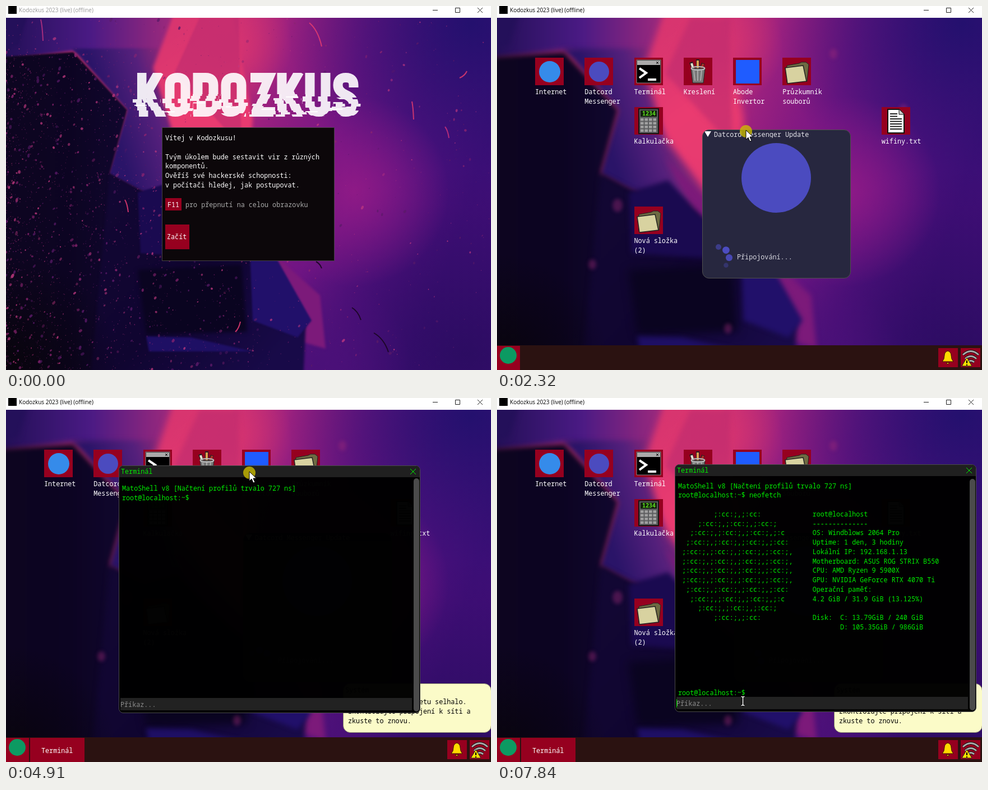
These frames come from a looping animation (865 by 648 pixels, 8000 ms). An HTML page with a canvas:

```html
<!DOCTYPE html>
<html lang="cs">
<head>
<meta charset="utf-8">
<title>Kodozkus 2023</title>
<style>
html, body { margin: 0; width: 100%; height: 100%; overflow: hidden; background: #100630; }
body { position: relative; font: 11.75px/17px "Noto Sans Mono", "DejaVu Sans Mono", monospace; color: #fff; }
div, canvas, svg { position: absolute; box-sizing: border-box; }
.t { white-space: pre; }
.red { background: #96001f; }
#bar { left: 0; top: 0; width: 865px; height: 21px; background: #fff; }
#name { left: 23px; top: 0; font: 10px/15px "Open Sans", "Noto Sans", sans-serif; }
#intro { left: 278px; top: 216px; width: 308px; height: 238px; background: #0c070a; border: 1px solid #454045; }
#update { width: 265px; height: 265px; border-radius: 12px; background: #27273f; border: 1px solid #50504e; overflow: hidden; }
#updateBar { left: 0; top: 0; width: 264px; height: 14px; overflow: hidden; color: #e4e4ea; }
#note { left: 601px; top: 508px; width: 265px; height: 88px; border-radius: 13px; background: #fbfbc8; border: 1px solid #8a8a70; color: #000; }
#term { width: 538px; height: 441px; border-radius: 8px; background: rgba(0,0,0,.985); border: 1px solid #4a4a4a; overflow: hidden; color: #00ee00; }
#termBar { left: 0; top: 0; width: 538px; height: 20px; background: #202020; }
#log { left: 5px; margin: 0; position: absolute; font: inherit; line-height: 16.77px; }
#logBox { left: 0; top: 21px; width: 524px; height: 393px; overflow: hidden; }
#scroll { left: 525px; width: 10px; border-radius: 5px; background: #4b4b4b; }
#input { left: 2px; top: 413px; width: 520px; height: 22px; background: #222; }
#caret { top: 4px; width: 1px; height: 15px; background: #00ee00; }
#halo { width: 22px; height: 22px; border-radius: 50%; background: rgba(205,190,0,.78); }
#tasks { left: 0; top: 604px; width: 865px; height: 44px; background: #2b1211; }
</style>
</head>
<body>
<div id="intro0"><canvas id="sharp" width="865" height="648"></canvas><div id="intro"></div></div>
<div id="desk">
  <canvas id="soft" width="865" height="648"></canvas>
  <div id="icons"></div>
  <div id="update">
    <svg width="265" height="265"><circle cx="131" cy="85" r="62" fill="#4b4bbf"/><g id="dots" fill="#5050cc"></g></svg>
    <div id="updateBar"><svg width="20" height="14"><path d="M3 2h12l-6 10z" fill="#fff"/></svg></div>
  </div>
  <div id="tasks">
    <div class="red" style="left:0;top:1px;width:41px;height:43px"></div>
    <div class="red" id="task" style="left:43px;top:1px;width:97px;height:43px"></div>
    <svg width="865" height="44">
      <circle cx="20" cy="18" r="15" fill="#0c9a62"/>
      <path d="M787 5h35v34h-35zM827 5h35v34h-35z" fill="#96001f"/>
      <path d="M794 29q4-4 4-11 0-6 6-8 6 2 6 8 0 7 4 11zM801 31h6l-3 3z" fill="#ffd800" stroke="#3a1400"/>
      <g fill="none" stroke="#111" stroke-width="5"><path id="waves" d="M831 17q14-13 28 0M835 24q10-9 20 0M839 30q6-5 12 0"/></g>
      <path d="M831 17q14-13 28 0M835 24q10-9 20 0M839 30q6-5 12 0" fill="none" stroke="#aaa" stroke-width="3"/>
      <path d="M838 22l9 15h-18z" fill="#ffe100" stroke="#222"/><path d="M838 27v5m0 2v2" stroke="#000" stroke-width="2"/>
    </svg>
  </div>
  <div id="note"></div>
  <div id="term">
    <div id="termBar"></div>
    <svg width="538" height="20"><path d="M519 5l10 10m0-10l-10 10" stroke="#00ee00"/></svg>
    <div id="logBox"><pre id="log"></pre></div>
    <div id="scroll"></div>
    <div id="input"><div id="typed" class="t" style="top:3px"></div><div id="caret"></div></div>
  </div>
</div>
<div id="bar">
  <svg width="865" height="21"><path d="M4 0h15v14H4z"/><path d="M761 7.5h9M801.5 3.5h8v8h-8zM841 3l9 9m0-9l-9 9" fill="none" stroke="#222"/></svg>
  <div id="name" class="t">Kodozkus 2023 (live) (offline)</div>
</div>
<div id="halo"></div>
<svg id="arrow" width="16" height="24"><path d="M1 1v17l4-4 3 7 3-1-3-7h5.500z" fill="#fff" stroke="#000"/></svg>
<svg id="beam" width="9" height="20"><g fill="none"><path d="M1 1.500h3v16H1m3 0h4M4 1.500h4" stroke="#000" stroke-width="3"/><path d="M1.500 1.500q3 0 3 2v12q0 2-3 2m6-16q-3 0-3 2m0 12q0 2 3 2" stroke="#fff" stroke-width="1.500"/></g></svg>

<script>
const $ = id => document.getElementById(id);
let seed = 11;
const rnd = () => (seed = seed * 16807 % 2147483647) / 2147483647;

// y is the visual middle of the line
function text(parent, x, y, str, color) {
  const d = document.createElement('div');
  d.className = 't';
  d.style.cssText = `left:${x}px;top:${y - 9}px;` + (color ? `color:${color}` : '');
  d.textContent = str;
  parent.append(d);
}

function wall(c, blur) {
  const poly = (color, soft, ...p) => {
    c.filter = `blur(${soft * blur}px)`;
    c.fillStyle = color;
    c.beginPath();
    for (let i = 0; i < p.length; i += 2) c.lineTo(p[i], p[i + 1]);
    c.fill();
  };
  const ramp = (x0, y0, x1, y1, ...colors) => {
    const g = c.createLinearGradient(x0, y0, x1, y1);
    colors.forEach((s, i) => g.addColorStop(i / (colors.length - 1), s));
    return g;
  };
  const glow = (x, y, r, color) => {
    const g = c.createRadialGradient(x, y, 0, x, y, r);
    g.addColorStop(0, color);
    g.addColorStop(1, color + '00');
    c.filter = 'none';
    c.fillStyle = g;
    c.fillRect(0, 0, 865, 648);
  };
  c.fillStyle = ramp(330, 170, 830, 330, '#d8346f', '#99207f', '#721583', '#561180', '#410e78');
  c.fillRect(0, 0, 865, 648);
  glow(830, 30, 330, '#24106e');
  glow(820, 620, 330, '#2c0c62');
  glow(620, 330, 170, '#8e1a86');
  glow(560, 640, 160, '#4a1078');
  poly(ramp(0, 40, 300, 40, '#241058', '#4a1a84', '#a02a7c'), 6, -40, -20, 310, -20, 275, 110, 120, 80, -40, 100);
  poly('#24105a', 5, -40, -20, 50, -20, 22, 70, -40, 80);
  poly(ramp(190, 220, 340, 170, '#2a1468', '#55207c', '#b02c74'), 5, 118, 76, 272, 75, 300, 210, 400, 370, 240, 330, 183, 300, 216, 185);
  poly(ramp(280, 60, 440, 280, '#d8356f', '#ea3b70', '#e63a70'), 7, 305, 0, 400, 0, 440, 200, 425, 395, 300, 235, 262, 110);
  glow(400, 70, 110, '#d83470');
  poly('#b82a7088', 4, 345, 21, 415, 21, 420, 250, 300, 120);
  poly('#7c1a7a', 5, 300, 270, 425, 395, 560, 515, 570, 610, 500, 590, 400, 450);
  poly(ramp(0, 300, 230, 300, '#0d0520', '#0c0422', '#110730'), 4, -30, 92, 120, 82, 216, 185, 185, 298, 250, 335, 270, 470, 220, 660, -30, 660);
  poly(ramp(200, 340, 500, 600, '#120733', '#100530', '#180a48'), 5, 185, 300, 245, 330, 310, 335, 440, 440, 500, 500, 535, 560, 530, 670, 150, 670);
  poly('#1a0a50', 4, 235, 332, 305, 310, 390, 400, 385, 450, 240, 440);
  poly('#0a0420', 8, 235, 470, 420, 460, 430, 580, 250, 585);
  poly('#21106a', 4, 435, 440, 480, 445, 545, 560, 520, 590, 440, 560);
  poly('#1e0f64', 4, 250, 588, 330, 590, 440, 615, 255, 615);
  glow(0, 640, 200, '#08040c');
  c.filter = 'none';
}

function specks(c) {
  for (let i = 0; i < 4200; i++) {
    const x = 865 * rnd() ** 1.7, y = 21 + 627 * rnd(), dark = x < 230 + (y - 80) * .45 && y > 85;
    if (!dark && rnd() < .75) continue;
    c.fillStyle = ['#8a2470', '#c23a80', '#5a1a68'][i % 3];
    c.globalAlpha = .35 + .5 * rnd();
    const r = rnd() ** 6 * 2 + .5;
    c.beginPath();
    c.ellipse(x, y, r, r * (.8 + rnd()), rnd(), 0, 7);
    c.fill();
  }
  c.globalAlpha = .9;
  c.lineWidth = 2;
  const streak = (color, x, y, dx, dy) => {
    c.strokeStyle = color;
    c.beginPath();
    c.moveTo(x, y);
    c.quadraticCurveTo(x + dx * .7, y + dy * .3, x + dx, y + dy);
    c.stroke();
  };
  streak('#e03a70', 541, 30, 22, 42);
  streak('#d8386e', 724, 170, 3, 32);
  streak('#d8386e', 809, 128, 13, -12);
  streak('#c0307a', 783, 215, 7, 20);
  streak('#e03a70', 212, 345, 6, 22);
  streak('#e03a70', 409, 580, 9, -18);
  streak('#b03080', 62, 24, 4, 38);
  streak('#180520', 617, 537, 16, 22);
  streak('#180520', 656, 582, 26, 34);
  streak('#180520', 553, 455, 10, 12);
}

// Title lettering: 44 x 78 strokes, lower half torn into shifted slices
function title(c) {
  const O = 'M8 22Q8 8.5 22 8.5T36 22V56Q36 69.5 22 69.5T8 56Z';
  const K = 'M8 0V78M39-2L14 42M20 32L41 82';
  const letters = [K, O, 'M8 8.5H22Q36 8.5 36 22V56Q36 69.5 22 69.5H8Z', O, 'M2 8.5H35L9 69.5H43', K,
    'M8 0V56Q8 69.5 22 69.5T36 56V0', 'M36 26V22Q36 8.5 22 8.5T8 22Q8 33 22 39T36 56Q36 69.5 22 69.5T8 56V52'];
  const word = Object.assign(document.createElement('canvas'), { width: 400, height: 78 });
  const w = word.getContext('2d');
  w.strokeStyle = '#fff';
  w.lineWidth = 17;
  letters.forEach((d, i) => {
    w.setTransform(1, 0, 0, 1, i * 50, 0);
    w.stroke(new Path2D(d));
  });
  letters.forEach((d, i) => {
    for (let y = 0, h; y < 78; y += h) {
      h = y ? Math.min(78 - y, 3 + Math.floor(rnd() * 7)) : 38;
      const dx = y && rnd() < .6 ? Math.round(rnd() * 16 - 8) : 0;
      c.drawImage(word, i * 50, y, 50, h, 234 + i * 50 + dx, 119 + y, 50, h);
    }
    c.fillStyle = '#fff';
    c.fillRect(234 + i * 50 + rnd() * 30 - 8, 158 + rnd() * 30, 22, 2);
  });
}

const sharp = $('sharp').getContext('2d');
wall(sharp, .45);
specks(sharp);
title(sharp);
const soft = $('soft').getContext('2d');
wall(soft, 1);
[[215, 355, 9], [170, 460, 7], [412, 574, 7], [725, 185, 8], [600, 85, 7]].forEach(([x, y, r]) => {
  soft.filter = 'blur(3px)';
  soft.fillStyle = '#a02a7866';
  soft.beginPath();
  soft.ellipse(x, y, r, r * 1.3, 0, 0, 7);
  soft.fill();
});

// Welcome panel
const intro = $('intro');
['Vítej v Kodozkusu!', '', 'Tvým úkolem bude sestavit vir z různých', 'komponentů.',
  'Ověříš své hackerské schopnosti:', 'v počítači hledej, jak postupovat.']
  .forEach((s, i) => text(intro, 5, 18 + i * 16.8, s));
intro.insertAdjacentHTML('beforeend', '<div class="red" style="left:5px;top:125px;width:29px;height:22px"></div><div class="red" style="left:5px;top:172px;width:43px;height:44px"></div>');
text(intro, 9, 137, 'F11');
text(intro, 41, 137, 'pro přepnutí na celou obrazovku', '#aaa');
text(intro, 8, 194, 'Začít');

// Desktop icons, drawn on 51 x 49 tiles
const folder = '<path d="M8 44V14l22-4 4-2h8l5 4-3 30z" fill="#6e6a42" stroke="#222"/><path d="M5 18l32-4 6 28-34 4z" fill="#d8d2a0" stroke="#222" stroke-width="1.500"/>';
const rows = (n, f) => Array.from({ length: n }, (_, i) => f(i)).join('');
const art = {
  net: '<circle cx="26" cy="25" r="19" fill="#358bea"/>',
  chat: '<circle cx="26" cy="25" r="18" fill="#4b4bbf"/>',
  shell: '<path d="M4 4h43v41H4z" stroke="#888"/><path d="M5 5h41v8H5z" fill="#aaa"/><path d="M39 7l4 4m0-4l-4 4" stroke="#000"/><path d="M9 19l12 8-12 9M24 39h15" fill="none" stroke="#fff" stroke-width="4"/>',
  cup: '<path d="M17 20L13 8m12 12V3m6 17l4-10" stroke="#222" stroke-width="6"/><path d="M17 20L14 10" stroke="#e8e0d0" stroke-width="4"/><path d="M25 20V5" stroke="#e0a050" stroke-width="4"/><path d="M31 20l4-9" stroke="#b03028" stroke-width="4"/><path d="M13 19h25l-3 26H16z" fill="#777" stroke="#222"/><path d="M18 23l2 18m5-18v18m7-18l-2 18" stroke="#aaa" stroke-width="2"/><ellipse cx="25.500" cy="19" rx="12" ry="3" fill="none" stroke="#bbb" stroke-width="2"/>',
  square: '<path d="M5 4h42v42H5z" fill="#1f5cff"/>',
  folder,
  calc: '<path d="M8 3h35v44H8z" fill="#5c5d5f" stroke="#161616" stroke-width="2"/><path d="M11 6h29v11H11z" fill="#12210c"/><text x="14" y="15" font-size="10" fill="#5fe020" font-weight="bold">1234</text>'
    + rows(16, i => `<rect x="${11 + i % 4 * 7.5}" y="${20 + (i >> 2) * 6.5}" width="5.5" height="4.5" fill="#a0a0a0"/>`),
  page: '<path d="M11 4h20l9 9v33H11z" fill="#fff" stroke="#111" stroke-width="2"/><path d="M31 4v9h9" fill="#ccc" stroke="#111"/>'
    + rows(7, i => `<path d="M15 ${12 + i * 4.500}h${i < 2 ? 13 : 21}" stroke="#222" stroke-width="2"/>`)
};
[['net', 0, 0, 'Internet'], ['chat', 1, 0, 'Datcord', 'Messenger'], ['shell', 2, 0, 'Terminál'], ['cup', 3, 0, 'Kreslení'],
  ['square', 4, 0, 'Abode', 'Invertor'], ['folder', 5, 0, 'Průzkumník', 'souborů'], ['calc', 2, 1, 'Kalkulačka'],
  ['page', 7, 1, 'wifiny.txt'], ['folder', 2, 3, 'Nová složka', '(2)']].forEach(([kind, col, row, ...label]) => {
  const x = 68 + col * 88.25, y = 92 + row * 88.3;
  $('icons').insertAdjacentHTML('beforeend', `<svg class="red" style="left:${Math.round(x)}px;top:${Math.round(y)}px" width="51" height="49">${art[kind]}</svg>`);
  label.forEach((s, i) => text($('icons'), x, y + 61 + i * 17, s));
});

text($('updateBar'), 20, 8, 'Datcord Messenger Update');
text($('update'), 61, 226, 'Připojování...', '#d8d8e0');
$('dots').innerHTML = rows(8, i => `<circle cx="${28 + 19 * Math.cos(i * Math.PI / 4)}" cy="${227 + 19 * Math.sin(i * Math.PI / 4)}"/>`);
const dots = [...$('dots').children];
text($('note'), 3, 11, 'Systém');
['Připojení k internetu selhalo.', 'Zkontrolujte připojení k síti a', 'zkuste to znovu.'].forEach((s, i) => text($('note'), 8, 32 + i * 17, s));
text($('task'), 20, 23, 'Terminál');
text($('termBar'), 3, 10, 'Terminál');

// Shell contents
const prompt = 'root@localhost:~$';
const head = 'MatoShell v8 [Načtení profilů trvalo 727 ns]\n' + prompt;
const info = ['root@localhost', '--------------', 'OS: Windblows 2064 Pro', 'Uptime: 1 den, 3 hodiny', 'Lokální IP: 192.168.1.13',
  'Motherboard: ASUS ROG STRIX B550', 'CPU: AMD Ryzen 9 5900X', 'GPU: NVIDIA GeForce RTX 4070 Ti', 'Operační paměť:',
  '4.2 GiB / 31.9 GiB (13.125%)', '', 'Disk:  C: 13.79GiB / 240 GiB', '       D: 105.35GiB / 986GiB'];
const fetched = head + ' neofetch\n\n' + rows(18, i => {
  const n = i < 12 ? 2 * Math.round(14.5 * Math.sqrt(1 - ((i - 5.5) / 6) ** 2)) : 0;
  const disc = ' '.repeat(15 - n / 2) + ';:cc:;,'.repeat(5).slice(0, n);
  return disc.padEnd(34) + (info[i] || '') + '\n';
}) + '\n' + prompt;

// [ms, x, y] stops of the pointer
const path = [[120, 352, 480], [520, 308, 409], [1190, 308, 409], [1720, 370, 181], [1990, 377, 204], [2050, 377, 204], [2320, 444, 222],
  [2640, 501, 242], [2720, 501, 242], [2850, 490, 236], [3710, 310, 113], [3920, 281, 114], [4320, 281, 114], [4580, 382, 126],
  [4785, 384, 126], [4850, 396, 126], [4910, 434, 132], [5140, 550, 130], [5220, 550, 130], [5580, 438, 539]];
const presses = [[590, 785], [2030, 2690], [4040, 4180], [4250, 4310], [4840, 5180]];
const keys = [6590, 6690, 6780, 7050, 7180, 7310, 7510, 7580];

function pointer(t) {
  const i = path.findIndex(p => p[0] > t);
  if (i < 0) return path.at(-1).slice(1);
  if (!i) return path[0].slice(1);
  const [t0, x0, y0] = path[i - 1], [t1, x1, y1] = path[i];
  const k = (t - t0) / (t1 - t0), e = t1 - t0 > 200 ? k * k * (3 - 2 * k) * .5 + k * .5 : k;
  return [x0 + (x1 - x0) * e, y0 + (y1 - y0) * e];
}

const show = (id, on) => $(id).style.display = on ? '' : 'none';
const place = (id, x, y) => $(id).style.transform = `translate(${Math.round(x)}px,${Math.round(y)}px)`;

function draw(now) {
  const step = 66.55, q = Math.max(0, 120 + step * Math.floor((now - 120) / step + .1));
  const [x, y] = pointer(q);
  $('name').style.color = now < 120 ? '#999' : '#000';
  show('intro0', now < 790);
  show('desk', now >= 790);

  const [ux, uy] = pointer(Math.min(Math.max(q, 2050), 2700));
  show('update', now >= 1190);
  place('update', ux - 78, uy - 2);
  $('updateBar').style.background = now >= 4030 ? '#1f1f33' : '';
  const spin = .61 + (q - 1190) * .00457;
  dots.forEach((d, i) => {
    const g = Math.max(0, Math.cos(i * Math.PI / 4 - spin));
    d.setAttribute('r', g && 3.5 + 3 * g);
    d.setAttribute('opacity', .1 + .85 * g);
  });
  show('note', now >= 2520);

  const open = now >= 4310;
  show('term', open);
  show('task', open);
  const [tx, ty] = pointer(Math.min(Math.max(q, 4850), 5200));
  place('term', tx - 233, ty - 12);
  const done = now >= 7780, end = now >= 7840;
  $('log').textContent = done ? fetched : head;
  $('log').style.top = (end ? 7.5 : 10) + 'px';
  $('scroll').style.top = (end ? 25 : 22) + 'px';
  $('scroll').style.height = (end ? 412 : 415) + 'px';
  const n = done ? 0 : keys.filter(k => k <= now).length;
  $('typed').textContent = n ? 'neofetch'.slice(0, n) : 'Příkaz...';
  $('typed').style.color = n ? '' : '#8c8c8c';
  show('caret', now >= 5780);
  $('caret').style.left = n * 7.05 + 'px';

  const text = q > 5540;
  show('halo', presses.some(([a, b]) => q >= a && q < b));
  place('halo', x - 11, y - 10);
  show('arrow', now >= 120 && !text);
  place('arrow', x - 1, y - 2);
  show('beam', text);
  place('beam', x - 4, y - (now < 5980 ? 8 : 9));
}

const start = performance.now();
(function loop() {
  draw((performance.now() - start) % 8000);
  requestAnimationFrame(loop);
})();
</script>
</body>
</html>
```
